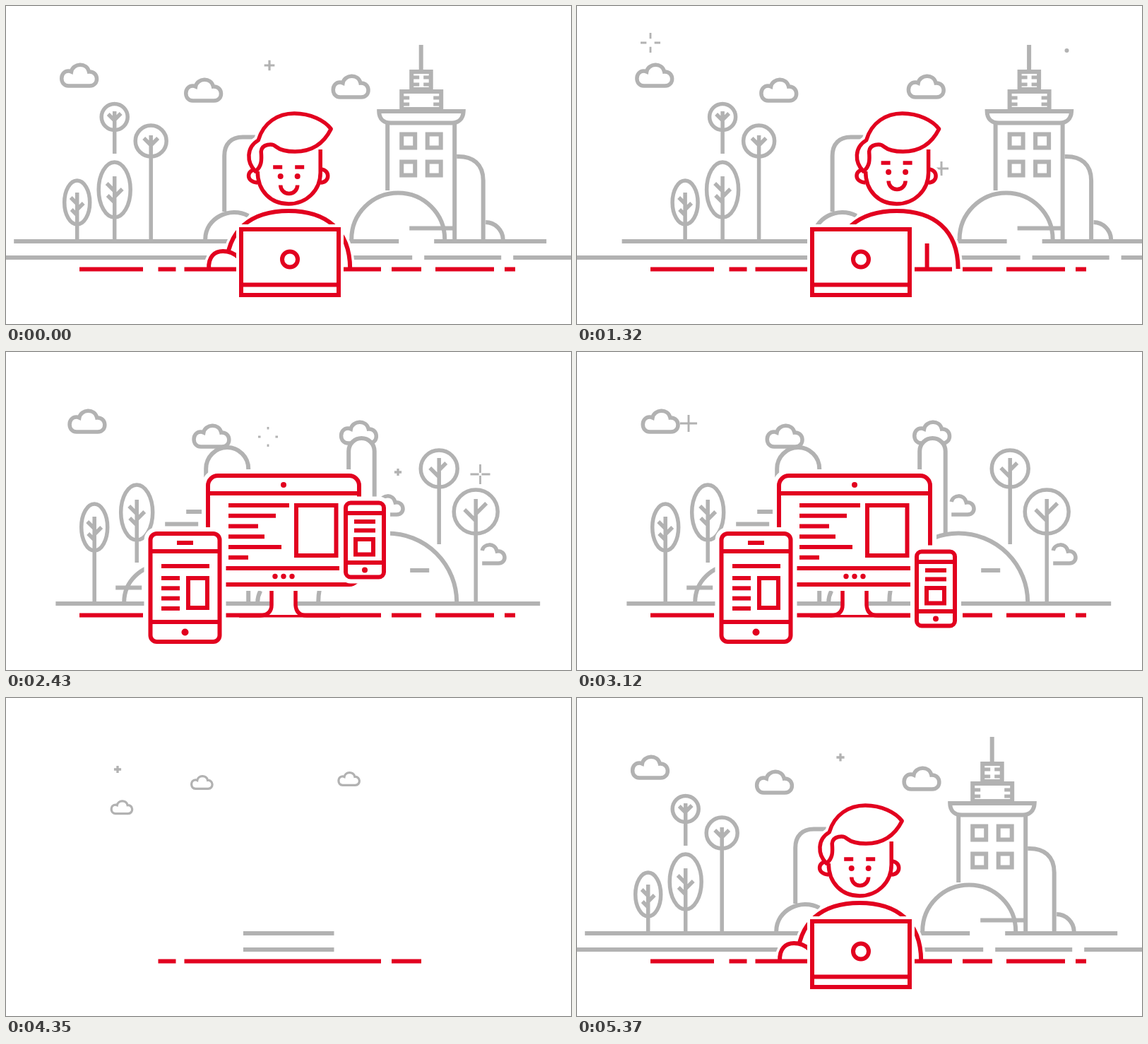
Write an HTML page with a canvas that moves like this. It is 800x450 px and loops after 5400 ms.

```html
<!DOCTYPE html>
<html lang="en">
<head>
<meta charset="utf-8">
<title>Work anywhere</title>
<style>
html, body { margin: 0; width: 100%; height: 100%; overflow: hidden; background: #fff; }
canvas { display: block; width: 800px; height: 450px; }
</style>
</head>
<body>
<canvas id="stage" width="800" height="450"></canvas>
<script>
const ctx = document.getElementById('stage').getContext('2d');
const LOOP = 5400, GRAY = '#b2b2b2', RED = '#e2001f', WHITE = '#fff';
const SLIDE = 767, DRIFT = 0.00465;
let t = 0;

const ease = (a, b) => {
  const u = Math.min(1, Math.max(0, (t - a) / (b - a)));
  return u * u * (3 - 2 * u);
};
const mix = (a, b, k) => a + (b - a) * k;

const cache = {};
const shape = d => cache[d] || (cache[d] = new Path2D(d));

function stroke(d, color, w = 6) {
  ctx.strokeStyle = color;
  ctx.lineWidth = w;
  ctx.stroke(shape(d));
}
function fill(d, color = WHITE) {
  ctx.fillStyle = color;
  ctx.fill(shape(d));
}
const gray = (d, w) => stroke(d, GRAY, w);
const red = (d, w) => stroke(d, RED, w);

function dot(x, y, r, color = RED) {
  ctx.fillStyle = color;
  ctx.beginPath();
  ctx.arc(x, y, r, 0, 7);
  ctx.fill();
}
function ring(x, y, rx, ry, color, w = 6) {
  ctx.strokeStyle = color;
  ctx.lineWidth = w;
  ctx.beginPath();
  ctx.ellipse(x, y, rx, ry, 0, 0, 7);
  ctx.stroke();
}
function bar(x1, x2, y, color = RED, w = 6) {
  ctx.fillStyle = color;
  ctx.fillRect(x1, y - w / 2, x2 - x1, w);
}
function frame(x1, y1, x2, y2, r, pad) {
  ctx.beginPath();
  ctx.roundRect(x1, y1, x2 - x1, y2 - y1, r);
  if (pad) {
    ctx.fillStyle = ctx.strokeStyle = WHITE;
    ctx.lineWidth = pad * 2;
    ctx.fill();
    ctx.stroke();
  }
  ctx.strokeStyle = RED;
  ctx.lineWidth = 6;
  ctx.stroke();
}

// Draws a part moved by (dx, dy).
function shift(dx, dy, draw) {
  ctx.save();
  ctx.translate(dx, dy);
  draw();
  ctx.restore();
}
// Draws a part scaled by k about a point.
function pop(x, y, k, draw) {
  if (k < 0.01) return;
  ctx.save();
  ctx.translate(x, y);
  ctx.scale(k, k);
  ctx.translate(-x, -y);
  draw();
  ctx.restore();
}
// Draws only what lies within a band around a centre line.
function band(x, half, draw) {
  if (half <= 0) return;
  ctx.save();
  ctx.beginPath();
  ctx.rect(x - half, 0, half * 2, 450);
  ctx.clip();
  draw();
  ctx.restore();
}

/* ---------- sky ---------- */

const CLOUD = 'M-15 14C-28 14-28-7-15-7Q-13-7-11-6C-9-18 11-20 14-6C28-7 29 14 15 14Z';
const CLOUDS = [[103.5, 99, 160, 138], [279.5, 120, 6.5, 0], [488, 115, 6, 0]];

function clouds() {
  const fresh = t > 4215;
  const k = fresh ? ease(4215, 4457) : 1 - ease(3900, 4150);
  for (const [x, y, dx, dy] of CLOUDS) {
    const far = fresh ? 1 - k : 0;
    shift(x + DRIFT * (fresh ? t - LOOP : t) + dx * far, y + dy * far,
      () => pop(0, 0, k, () => gray(CLOUD, 5.5)));
  }
}

const SPARKS = [
  [373, 84, 5275], [719, 81, 300], [104, 52, 977], [516, 230, 1148],
  [693.5, 63, 1320], [72, 195, 1433], [371, 120, 1998], [671.5, 173, 2156],
  [555, 170, 2344], [232, 172, 2600], [158, 101, 2914], [158, 101, 4264]
];

function sparks() {
  for (const [x, y, start] of SPARKS) {
    const p = ((t - start + LOOP) % LOOP) / 480;
    if (p >= 1) continue;
    const outer = Math.max(2.5, 14 * Math.min(1, p * 2));
    const inner = 13 * Math.max(0, p * 2 - 1);
    if (p < 0.08) { dot(x, y, 3, GRAY); continue; }
    ctx.strokeStyle = GRAY;
    ctx.lineWidth = mix(3.6, 2.8, Math.min(1, p * 2));
    ctx.beginPath();
    for (const [dx, dy] of [[1, 0], [0, 1], [-1, 0], [0, -1]]) {
      ctx.moveTo(x + dx * inner, y + dy * inner);
      ctx.lineTo(x + dx * outer, y + dy * outer);
    }
    ctx.stroke();
  }
}

/* ---------- city ---------- */

function leafTree(x, y, rx, ry, top, foot, twig) {
  ring(x, y, rx, ry, GRAY, 5.5);
  const m = y + 2;
  gray(`M${x} ${top}V${foot}M${x - twig} ${m - twig}L${x} ${m}M${x + twig} ${m + 8 - twig}L${x} ${m + 8}` +
    `M${x - twig + 1} ${m + 17 - twig}L${x} ${m + 16}`, 5.5);
}
function roundTree(x, y, r, top, foot, left, right) {
  ring(x, y, r, r, GRAY, 5.5);
  gray(`M${x} ${top}V${foot}M${x - left[0]} ${y + left[1]}l${left[0]} ${left[0]}` +
    `M${x + right[0]} ${y + right[1]}l${-right[0]} ${right[0]}`, 5.5);
}

function tower() {
  gray('M588.500 55V92M575 93H602.500V118H575ZM561 121H617V146H561ZM541 167V261M636 167V330');
  gray('M577 101H586M577 111H586M592 101H601M592 111H601M562 130H572M562 139H572M606 130H616M606 139H616', 5);
  gray('M529 149H648.500C648 160 641 165.500 632 165.500H545.500C536 165.500 529 160 529 149Z');
  for (const x of [561, 597.5])
    for (const y of [181.500, 220.500]) gray(`M${x} ${y}h19v19h-19Z`);
}

const HAIR = 'M358 190C365 165 386 152 409 152C432 152 452 162 461 174C452 192 437 206 410 206' +
  'C398 206 388 203 383 199C378 194 363 195 362 206C363 218 363 227 354 234C341 221 341 200 358 190Z';
const FACE = 'M357 234C357 262 376 280 401 280C426 280 446 261 446 236V203';
const EARS = 'M355 231C341 232 340 249 357 250M446 231C460 231 460 250 446 250';
const TORSO = 'M313 372C313 316 349 290 401 290C453 290 488 316 488 372';
const ARM = 'M288 372C287 355 296 347 308 347C317 347 325 351 330 356V372';

function features() {
  bar(379, 392, 228, RED, 5.5);
  bar(410, 423, 228, RED, 5.5);
  dot(389.5, 241, 4);
  dot(413.5, 241, 4);
  red('M389.500 253.500A12 12 0 0 0 413.500 253.500', 5.5);
}

function person() {
  for (const d of [TORSO, ARM, FACE, EARS, HAIR]) {
    fill(d);
    stroke(d, WHITE, 13);
  }
  red(TORSO);
  red('M444 336V372');
  fill(ARM);
  red('M288 372C287 355 296 347 308 347C317 347 325 351 330 356');
  red(EARS, 5.5);
  fill(FACE);
  red(FACE, 5.5);
  fill(HAIR);
  ctx.lineJoin = 'round';
  red(HAIR, 5.5);
  ctx.lineJoin = 'miter';
  // The eyes leave the screen just before the scene moves on.
  shift(0, t < 2000 ? -6 * ease(990, 1230) : 0, features);
}

function city() {
  const grow = (a, b) => t < 2000 ? 1 : ease(a, b);
  ctx.save();
  ctx.translate((t < 2000 ? SLIDE * ease(1230, 1800) : 0) - 0.8, 0);
  const ground = () => {
    for (const [a, b, y] of [[12, 557, 333], [607, 766, 333], [-60, 576, 356], [593, 702, 356], [719, 860, 356]])
      bar(a, b, y, GRAY);
  };
  if (t < 2000) ground(); else band(401, 401 * ease(4280, 4560), ground);
  pop(154, 330, grow(4620, 4920), () => roundTree(154.5, 157, 18.5, 149, 209, [9, -4], [9, -5]));
  pop(206, 330, grow(4680, 4980), () => roundTree(206, 191, 22, 183, 330, [10, -4], [10, -4]));
  pop(154, 330, grow(4560, 4860), () => leafTree(154.5, 260, 22.5, 39, 241, 330, 11));
  pop(101, 330, grow(4620, 4890), () => leafTree(101.5, 278, 18, 31, 264, 330, 9));
  pop(330, 330, grow(4590, 4920), () => {
    gray('M310 291V212C310 195 320 185.500 336 185.500H356M283 330C283 300 318 283 344 297');
  });
  pop(588, 330, grow(4620, 5190), tower);
  pop(555, 330, grow(4560, 4890), () => gray('M490 330A66 65.500 0 0 1 622 330'));
  pop(602, 314, grow(4800, 5000), () => bar(572, 634, 314.500, GRAY));
  pop(670, 330, grow(4680, 5010), () => gray('M639 213C662 212 676.500 224 676.500 247V330M680 306A25 25 0 0 1 704.500 330'));
  pop(400, 372, grow(4860, 5160), person);
  ctx.restore();
}

/* ---------- park ---------- */

const HALF_CLOUD = 'M0-18C2-28 18-30 21-17C34-19 36 0 23 0H0';

function block(x1, x2, top, foot) {
  const r = (x2 - x1) / 2;
  const d = `M${x1} ${foot}V${top + r}A${r} ${r} 0 0 1 ${x2} ${top + r}V${foot}`;
  fill(d);
  gray(d);
}

function park() {
  const keep = (a, b) => 1 - ease(a, b);
  const halfCloud = () => gray(HALF_CLOUD, 5.5);
  ctx.save();
  ctx.translate(SLIDE * (ease(1230, 1800) - 1) - 0.8, 0);
  pop(314, 356, keep(3660, 3990), () => {
    block(284, 344, 135, 354);
    ctx.fillStyle = WHITE;
    ctx.fillRect(279, 216, 10, 20);
  });
  pop(385, 356, keep(3660, 3960), () => {
    block(366, 403, 193, 276);
    gray('M361 338Q357 346 357 354');
  });
  pop(504, 356, keep(3690, 4020), () => {
    bar(389, 484, 220, GRAY);
    block(486, 522.5, 122, 270);
  });
  pop(541, 356, keep(3720, 4050), () => {
    fill('M443 354A98 97.500 0 0 1 639 354');
    gray('M443 354A98 97.500 0 0 1 639 354');
  });
  pop(222, 356, keep(3660, 3960), () => gray('M168 354A54 52.500 0 0 1 276 354'));
  for (const [a, b, y] of [[256, 296, 226], [226, 273, 243.500], [156, 193, 333.500], [573, 600, 309]])
    pop((a + b) / 2, y, keep(3600, 3840), () => bar(a, b, y, GRAY));
  pop(126, 356, keep(3600, 3900), () => leafTree(126, 248, 18.5, 33, 233, 354, 10));
  pop(186, 356, keep(3630, 3930), () => leafTree(186, 227, 22.5, 39, 209, 298, 11));
  pop(614, 356, keep(3630, 3930), () => roundTree(614, 165, 26, 150, 272, [13, -1], [10, -8]));
  pop(666, 356, keep(3600, 3900), () => roundTree(666, 226, 31, 208, 354, [16, -3], [15, -12]));
  pop(547, 218, keep(3600, 3840), () => shift(531, 230, halfCloud));
  pop(691, 286, keep(3600, 3840), () => shift(675, 299, halfCloud));
  band(414, 343 * keep(3690, 4140), () => bar(71, 758, 356, GRAY));
  ctx.restore();
}

/* ---------- devices ---------- */

const DASHES = [[104, 194], [215.5, 240.5], [252.5, 531], [546, 588], [608, 691], [706, 721]];

function table() {
  const half = t < 4010 ? 326 * (1 - ease(3600, 4005)) : 326 * ease(4020, 4620);
  band(400, half, () => DASHES.forEach(([a, b]) => bar(a, b, 372.500)));
}

function laptop() {
  frame(333, 316, 471, 409, 0, 7);
  bar(333, 471, 394.500);
  ring(402, 358.500, 11, 11, RED);
}

function monitor() {
  const m = ease(1800, 2070), c = ease(2010, 2310), stand = ease(1980, 2190);
  if (stand > 0.01) {
    ctx.save();
    ctx.translate(0, 329);
    ctx.scale(1, stand);
    ctx.translate(0, -329);
    fill('M376 330H410V360Q411 372 424 372H362Q376 372 376 360Z');
    red('M330 373H360Q376 372 376 358V330M410 330V358Q411 373 426 373H473', 5.5);
    ctx.restore();
  }
  const x1 = mix(333, 286, m), x2 = mix(471, 500, m);
  frame(x1, mix(282, 175, m), x2, mix(375, 329, m), 14 * m, mix(7, 9, m));
  bar(x1, x2, mix(360.5, 306, m));
  pop(402, mix(324.5, 250, m), 1 - m, () => ring(402, mix(324.5, 250, m), 11, 11, RED));
  if (c < 0.01) return;
  bar(393 - 107 * c, 393 + 107 * c, 200);
  dot(393, 188, 4 * c);
  for (const x of [381, 393, 405]) dot(x, 317.500, 3.7 * c);
  [86, 67, 42, 51, 75, 28].forEach((w, i) => bar(315, 315 + w * c, 217 + i * 14.75));
  pop(439, 253, c, () => red('M411 217H467.500V288H411Z'));
}

function tablet() {
  frame(204.5, 257, 302.5, 410, 9, 9);
  bar(205, 302, 282);
  bar(205, 302, 382);
  bar(242, 265, 270);
  dot(253.5, 396.5, 5);
  bar(220, 288, 303);
  for (let i = 0; i < 4; i++) bar(220, 246, 320 + i * 14.3);
  red('M258 320H285V362H258Z');
}

function phone() {
  frame(481, 282.5, 535, 387.5, 7, 9);
  bar(481, 535, 297);
  bar(481, 535, 367);
  dot(508, 377.5, 4);
  bar(493, 523, 309);
  bar(493, 523, 321.5);
  red('M495 334H520V355.500H495Z');
}

function devices() {
  if (t < 1800) return shift(0, -34 * ease(1320, 1740), laptop);
  if (t > 4600) return pop(402, 362, ease(5140, 5340), laptop);
  pop(393, 372, 1 - ease(3840, 4140), monitor);
  pop(253.5, 333, ease(2190, 2400) * (1 - ease(3780, 4110)), tablet);
  shift(0, -69 * (1 - ease(2430, 2730)),
    () => pop(508, 335, ease(2250, 2420) * (1 - ease(3690, 3960)), phone));
}

function draw(now) {
  t = now % LOOP;
  ctx.fillStyle = WHITE;
  ctx.fillRect(0, 0, 800, 450);
  sparks();
  clouds();
  if (t > 1230 && t < 4200) park();
  if (t < 1800 || t > 4270) city();
  table();
  devices();
}

const begin = performance.now();
function tick() {
  draw(performance.now() - begin);
  requestAnimationFrame(tick);
}
tick();
</script>
</body>
</html>
```
